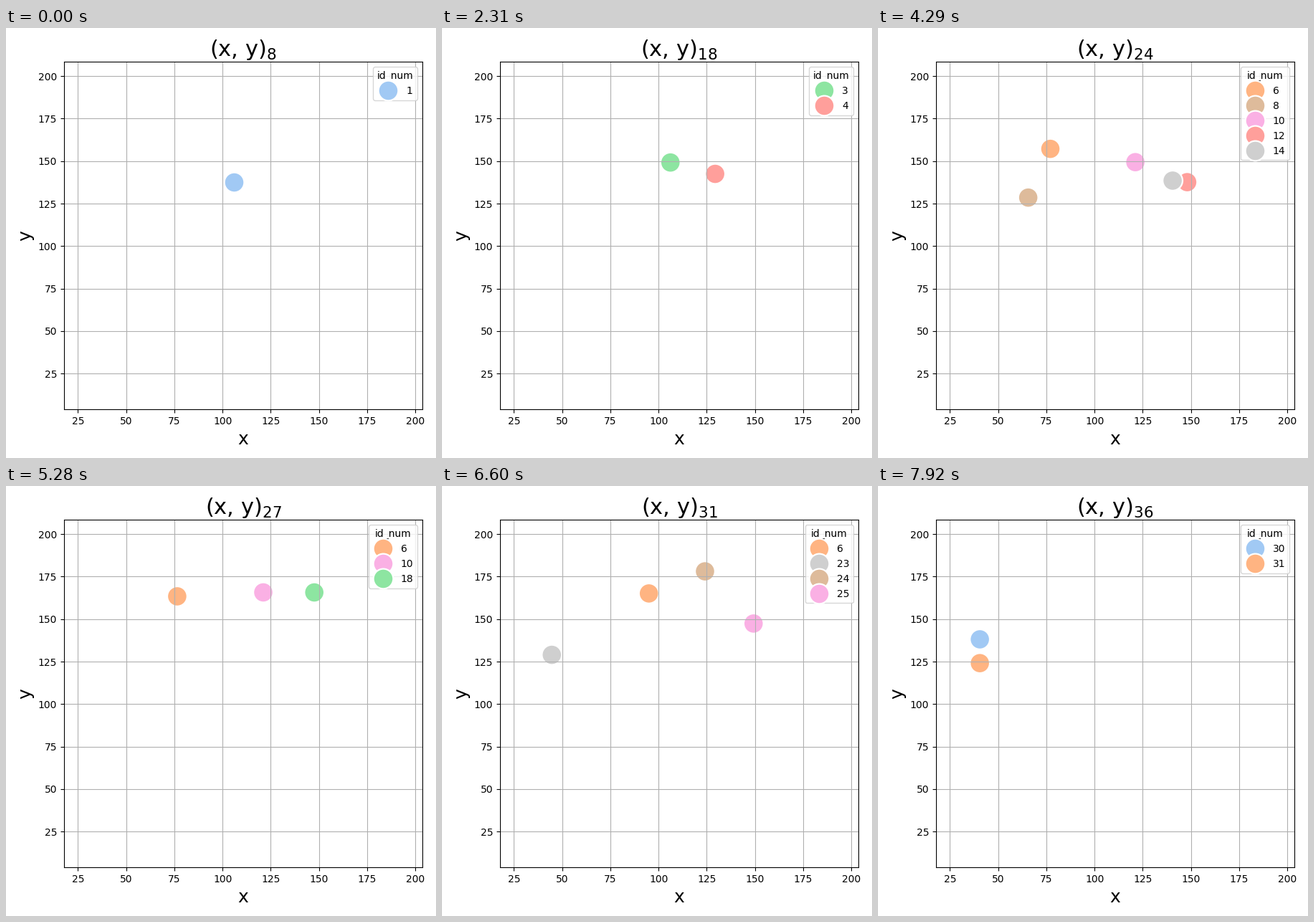
Recreate the animation shown at these times as a matplotlib script. Size 600 by 600 pixels, loop 8 s.

```python
import numpy as np
import matplotlib.pyplot as plt
from matplotlib.animation import FuncAnimation
from matplotlib.lines import Line2D

plt.rcParams["font.family"] = "DejaVu Sans"

SIZE, DPI = 600, 100
LOOP, INTERVAL, HOLD = 8000, 40, 330
AREA, EDGE = 400, 1.6
LABELS = [8, 9, *range(13, 35), 36]

PASTEL = dict(blue="#A1C9F4", orange="#FFB482", green="#8DE5A1",
              red="#FF9F9B", purple="#D0BBFF", brown="#DEBB9B",
              pink="#FAB0E4", grey="#CFCFCF")

walks = {}


def walk(num, color, first, last, *keys):
    """A point seen from step first to last, on a smooth curve through
    key places that are evenly spaced in time."""
    time = np.linspace(first, last, len(keys)) - first
    curve = np.polyfit(time, keys, len(keys) - 1)
    walks[num] = PASTEL[color], first, last, curve


walk(1, "blue", 0, 2, (106, 137.6), (108.7, 139.1))
walk(2, "orange", 3, 3, (108.3, 136.7))
walk(3, "green", 3, 9, (104.6, 163.6), (110.1, 150.9), (89.7, 149.5))
walk(4, "red", 5, 11, (124.1, 145.1), (130.8, 141.6), (130.3, 140.6))
walk(6, "orange", 10, 20, (90.1, 146.8), (75.3, 161.8), (95, 165.1))
walk(8, "brown", 11, 14, (62.8, 125.6), (67, 130))
walk(9, "green", 11, 12, (147.3, 124.5), (145.3, 127.3))
walk(10, "pink", 11, 18, (121.2, 138.5), (121.1, 176.6))
walk(18, "green", 16, 18, (147.6, 165.7), (149, 160))
walk(23, "grey", 17, 22, (52.2, 132.4), (45.8, 131.3), (40.3, 112.7))
walk(24, "brown", 18, 21, (121.9, 174.5), (125.2, 179.9))
walk(25, "pink", 20, 22, (149.3, 147.4), (148, 150))
walk(29, "purple", 22, 23, (49, 127), (44, 126))
walk(30, "blue", 22, 24, (43, 136), (40.5, 138.1))
walk(31, "orange", 24, 24, (40.5, 124.1))

# short visits on the right-hand side
rng = np.random.default_rng(4)
for i, color in enumerate(("red", "grey", "purple")):
    place = rng.uniform((132, 134), (146, 146))
    walk(12 + 2 * i, color, 12 + i, 13 + i, place, place + rng.uniform(-3, 3, 2))


def alive(step):
    """List (id, color, place) of every point present at a step."""
    return [(num, color, [np.polyval(c, step - first) for c in curve.T])
            for num, (color, first, last, curve) in sorted(walks.items())
            if first <= step <= last]


fig = plt.figure(figsize=(SIZE / DPI, SIZE / DPI), dpi=DPI)
ax = fig.add_axes([81 / SIZE, 67.7 / SIZE, 500 / SIZE, 484.8 / SIZE])
ax.set(xlim=(17.77, 203.67), ylim=(3.88, 208.28))
ax.set_xticks(range(25, 201, 25))
ax.set_yticks(range(25, 201, 25))
ax.set_xlabel("x", fontsize=18)
ax.set_ylabel("y", fontsize=18)
ax.grid(True)
title = ax.set_title("", fontsize=22)
dots = ax.scatter([], [], s=AREA, linewidths=EDGE, edgecolors="white")


def handle(color):
    return Line2D([], [], linestyle="", marker="o", color=color,
                  markersize=AREA ** 0.5, markeredgecolor="white",
                  markeredgewidth=EDGE)


def update(i):
    step = ((i + 1) * INTERVAL - 1) // HOLD
    nums, colors, places = zip(*alive(step))
    dots.set_offsets(places)
    dots.set_facecolors(colors)
    title.set_text(f"(x, y)$_{{{LABELS[step]}}}$")
    ax.legend([handle(c) for c in colors], nums, title="id_num",
              loc="upper right")
    return dots, title


anim = FuncAnimation(fig, update, frames=LOOP // INTERVAL,
                     init_func=lambda: update(0), interval=INTERVAL,
                     repeat=True, repeat_delay=0, blit=False)
plt.show()
```
